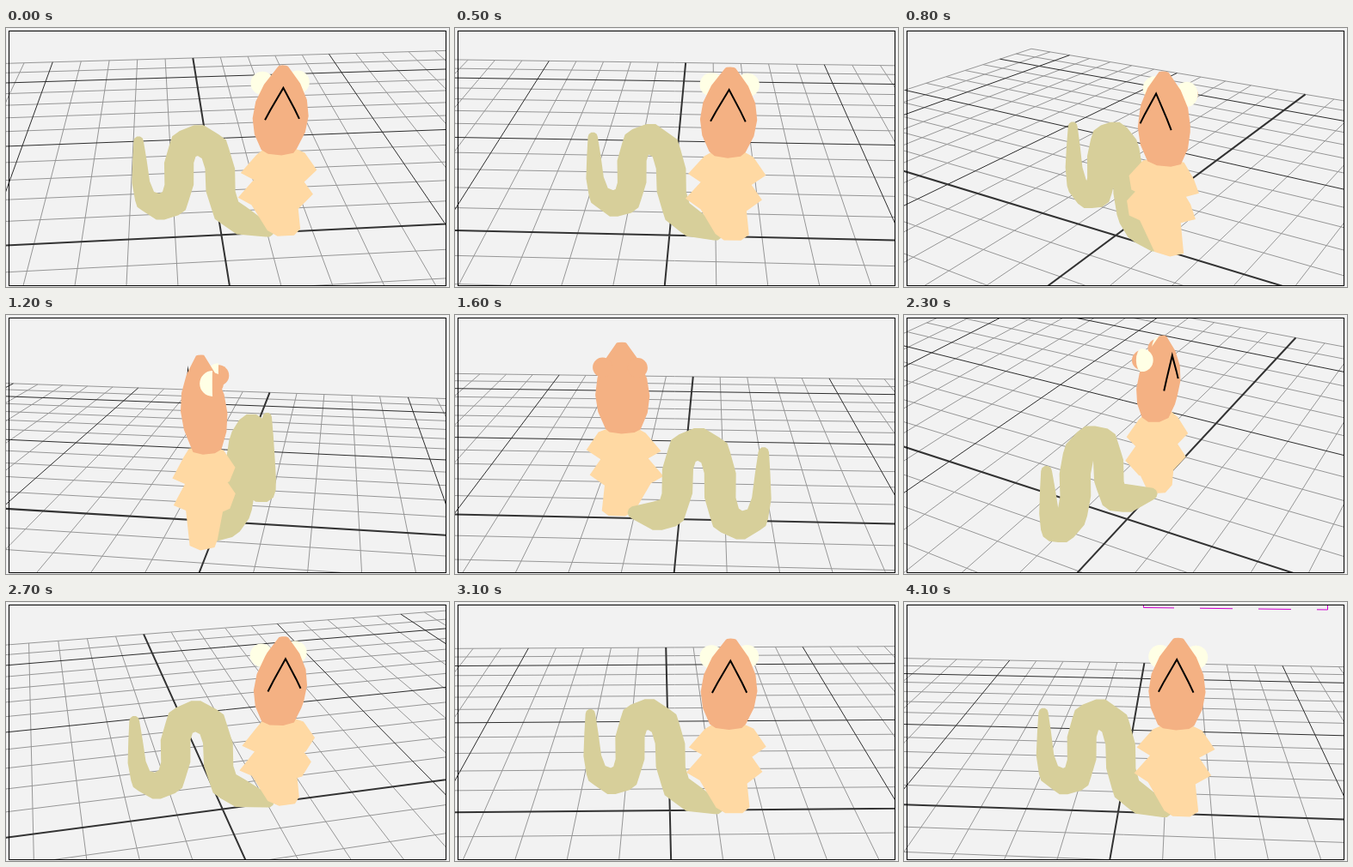
These frames come from a looping animation (515x302 px, 4.2 s). An HTML page with a canvas:

```html
<!DOCTYPE html>
<html lang="en">
<head>
<meta charset="utf-8">
<title>Turntable</title>
<style>
html, body { margin: 0; width: 100%; height: 100%; overflow: hidden; background: #f2f2f2; }
canvas { display: block; }
</style>
</head>
<body>
<canvas id="stage" width="515" height="302"></canvas>
<script>
const ctx = document.getElementById('stage').getContext('2d');
const { PI, sin, cos, abs, min, max } = Math;
const LOOP = 4200, FOCAL = 860, DIST = 15.4, RAD = PI / 180;
const TARGET = [0.1, 1.8, -0.15];
const SKIN = '#f4b183', FUR = '#ffd9a3', TAIL = '#d7cf9a', CREAM = '#ffffe5';

// Camera orbit: time, azimuth, elevation
const orbit = [
  [300, -5.2, 26.3], [800, 32.3, 22.4], [1200, 98.5, 17.7], [1600, 182.8, 20.3],
  [2000, 255.6, 31], [2700, 346.2, 26.4], [3100, 359, 23.5]
];
const lastPose = [364.2, 20.8];

let sa, ca, se, ce;

function setCamera(azimuth, elevation) {
  sa = sin(azimuth * RAD); ca = cos(azimuth * RAD);
  se = sin(elevation * RAD); ce = cos(elevation * RAD);
}

function toView(x, y, z) {
  x -= TARGET[0]; y -= TARGET[1]; z -= TARGET[2];
  const ahead = -(x * sa + z * ca);
  return [x * ca - z * sa, ahead * se + y * ce, DIST + ahead * ce - y * se];
}

const toScreen = ([r, u, d]) => [255 + FOCAL * r / d, 151 - FOCAL * u / d];
const project = (x, y, z) => toScreen(toView(x, y, z));
const nearness = (x, z) => x * sa + z * ca;
const range = (n, make) => Array.from({ length: n }, (_, i) => make(i));
const around = (n, place) => range(n, i => place(cos(i * 2 * PI / n), sin(i * 2 * PI / n)));

function slope(k, c) {
  if (k === 0 || k === orbit.length - 1) return 0;
  return (orbit[k + 1][c] - orbit[k - 1][c]) / (orbit[k + 1][0] - orbit[k - 1][0]);
}

// Smooth cubic through the orbit keys
function pose(t) {
  if (t >= 4100) return lastPose;
  t = min(max(t, 300), 3100);
  let k = 0;
  while (k < orbit.length - 2 && t > orbit[k + 1][0]) k++;
  const span = orbit[k + 1][0] - orbit[k][0], s = (t - orbit[k][0]) / span;
  return [1, 2].map(c =>
    orbit[k][c] * (1 + 2 * s) * (1 - s) ** 2 + orbit[k + 1][c] * s * s * (3 - 2 * s) +
    span * s * (1 - s) * (slope(k, c) * (1 - s) - slope(k + 1, c) * s));
}

function line3(a, b) {
  let p = toView(...a), q = toView(...b);
  if (p[2] > q[2]) [p, q] = [q, p];
  const near = 0.5;
  if (q[2] < near) return;
  if (p[2] < near) {
    const s = (near - p[2]) / (q[2] - p[2]);
    p = p.map((v, i) => v + (q[i] - v) * s);
  }
  ctx.moveTo(...toScreen(p));
  ctx.lineTo(...toScreen(q));
}

function drawGrid() {
  const styles = [
    [i => i % 5 !== 0, '#969696', 1], [i => i && i % 5 === 0, '#2c2c2c', 1], [i => i === 0, '#333', 2]
  ];
  for (const [match, color, width] of styles) {
    ctx.beginPath();
    for (let i = -12; i <= 12; i++) {
      if (!match(i)) continue;
      line3([i, 0, -12], [i, 0, 12]);
      line3([-12, 0, i], [12, 0, i]);
    }
    ctx.strokeStyle = color;
    ctx.lineWidth = width;
    ctx.stroke();
  }
}

function addHull(points) {
  points.sort((a, b) => a[0] - b[0] || a[1] - b[1]);
  const chain = list => {
    const out = [];
    for (const p of list) {
      while (out.length > 1) {
        const [a, b] = out.slice(-2);
        if ((b[0] - a[0]) * (p[1] - a[1]) - (b[1] - a[1]) * (p[0] - a[0]) > 0) break;
        out.pop();
      }
      out.push(p);
    }
    return out.slice(0, -1);
  };
  const hull = [...chain(points), ...chain([...points].reverse())];
  hull.forEach((p, i) => i ? ctx.lineTo(...p) : ctx.moveTo(...p));
  ctx.closePath();
}

// Fills the joined hulls of neighbouring outlines
function fillChain(outlines, color) {
  ctx.beginPath();
  for (let i = 1; i < outlines.length; i++) addHull([...outlines[i - 1], ...outlines[i]]);
  ctx.fillStyle = color;
  ctx.fill();
}

const ring = (sides, x, y, z, r) => around(sides, (c, s) => project(x + r * c, y, z + .8 * r * s));

function ball(x, y, z, r) {
  const view = toView(x, y, z), [px, py] = toScreen(view), pr = r * FOCAL / view[2];
  return around(10, (c, s) => [px + pr * c, py + pr * s]);
}

// A meander on a bent sheet, thin at the tip
function drawTail() {
  const bead = (x, y, r) => ball(x, y, .123 * (x + 1.75) ** 2 - .85, r);
  const beads = range(15, i => {
    const turn = .2 + .2 * i, a = turn * PI;
    const x = max(-1.7, -2.18 + .88 * turn + .14 * sin(2 * a));
    return bead(x, 1.215 + .89 * cos(a) - .045 * turn, min(.32, .06 + .23 * turn));
  });
  fillChain([...beads, bead(1, .1, .14)], TAIL);
}

function drawBody() {
  const tufts = range(5, i => {
    const wide = i % 2;
    return ring(6, 1.22 - .025 * i, 1.96 - .29 * i - .12 * wide, .1, wide ? .8 : .5);
  });
  fillChain([...tufts, ring(6, 1.35, .12, .1, .36)], FUR);
}

function drawMouth() {
  ctx.beginPath();
  for (const u of [-1, -.7, 0, .7, 1])
    ctx.lineTo(...project(1.17 + .34 * u, 3.52 - .6 * abs(u) - .06 * u * u, .4));
  ctx.strokeStyle = '#000';
  ctx.lineWidth = 2;
  ctx.stroke();
}

function drawHead() {
  if (ca < 0) drawMouth();
  fillChain(range(6, i => {
    const t = i / 5;
    return ring(8, 1.19, 2.05 + 1.82 * t, .06 + .1 * t, .37 + t - 1.27 * t * t);
  }), SKIN);
  if (ca >= 0) drawMouth();
}

// A ball whose front half is cream
function drawEar(x) {
  const view = toView(x, 3.43, -.13), r = .235 * FOCAL / view[2];
  ctx.save();
  ctx.translate(...toScreen(view));
  ctx.scale(sa > 0 ? -1 : 1, 1);
  ctx.fillStyle = SKIN;
  ctx.beginPath();
  ctx.arc(0, 0, r * .85, 0, 7);
  ctx.fill();
  ctx.fillStyle = CREAM;
  ctx.beginPath();
  ctx.arc(0, 0, r, -PI / 2, PI / 2);
  ctx.ellipse(0, 0, r * (ca > 0 ? ca : ca * ca), r, 0, PI / 2, ca > 0 ? PI * 1.5 : -PI / 2, ca <= 0);
  if (ca > -.9) ctx.fill();
  ctx.restore();
}

function drawFigure() {
  const parts = [
    [nearness(-.4, -.4), drawTail],
    [nearness(1.2, .15), drawBody],
    [nearness(1.2, .15) + .001, drawHead],
    ...[.84, 1.55].map(x => [nearness(x, -.13), () => drawEar(x)])
  ];
  parts.sort((a, b) => a[0] - b[0]).forEach(part => part[1]());
}

// Dashed marquee along the top edge
function drawSelection() {
  ctx.beginPath();
  for (const p of [[278.5, 4], [278.5, 6.5], [492.5, 9], [492.5, 4]]) ctx.lineTo(...p);
  ctx.strokeStyle = '#d000d0';
  ctx.setLineDash([38, 30]);
  ctx.stroke();
  ctx.setLineDash([]);
}

function draw(now) {
  const t = Math.floor(now % LOOP / 100) * 100;
  setCamera(...pose(t));
  ctx.fillStyle = '#f2f2f2';
  ctx.fillRect(0, 0, 515, 302);
  ctx.save();
  ctx.beginPath();
  ctx.rect(0, 4, 511, 297);
  ctx.clip();
  drawGrid();
  drawFigure();
  ctx.restore();
  ctx.strokeStyle = '#000';
  ctx.lineWidth = 1;
  ctx.strokeRect(3.5, 3.5, 508, 297);
  if (t >= 4100) drawSelection();
}

const start = performance.now();
function tick() {
  draw(performance.now() - start);
  requestAnimationFrame(tick);
}
tick();
</script>
</body>
</html>
```
